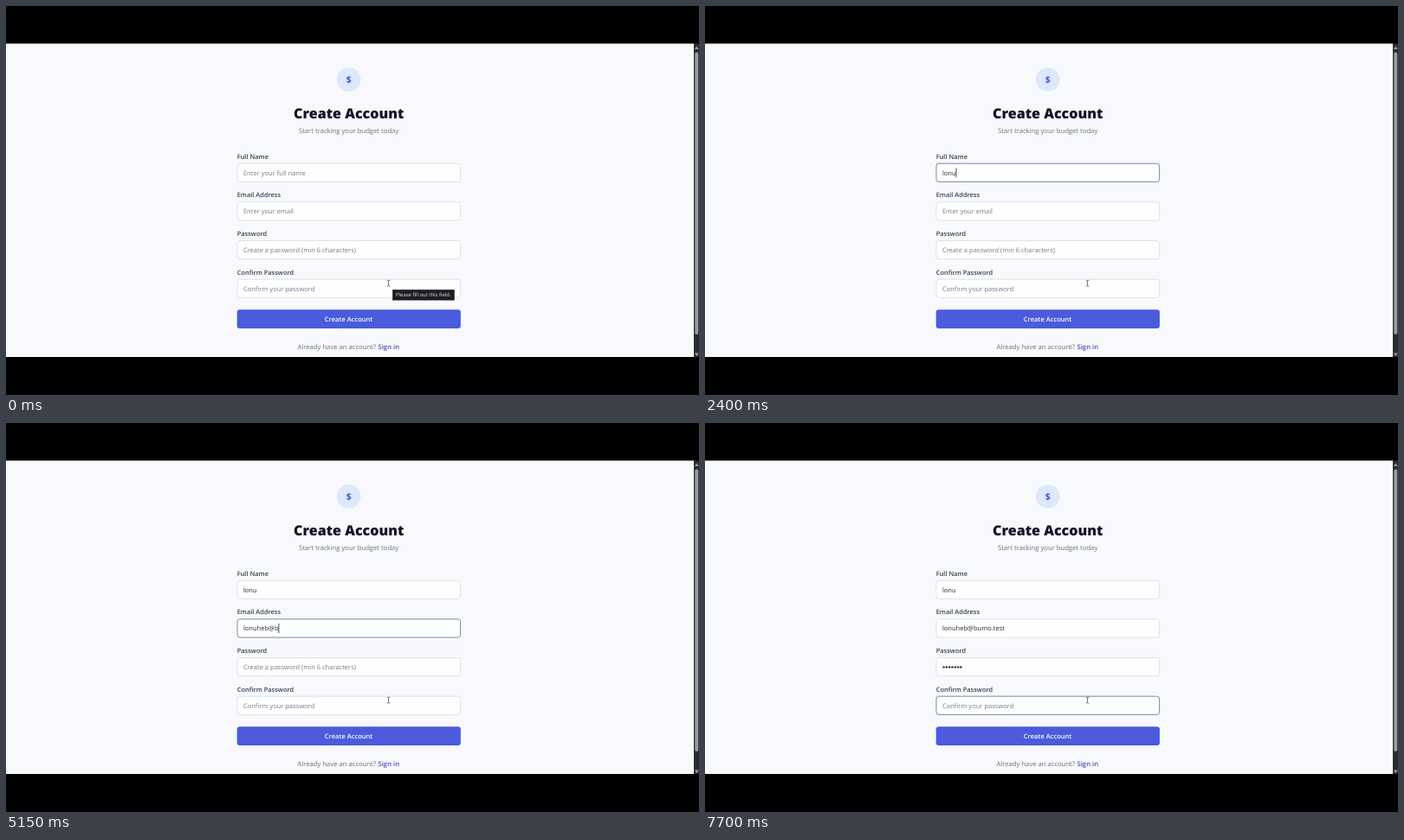
Animation of 800 by 450 pixels, one loop 8000 ms. Source, as an HTML page:

```html
<!DOCTYPE html>
<html lang="en">
<head>
<meta charset="utf-8">
<title>Create Account</title>
<style>
  html, body { margin: 0; width: 100%; height: 100%; overflow: hidden; background: #000; }
  svg { display: block; width: 100%; height: 100%; }
  text { font-family: "Open Sans", "Noto Sans", sans-serif; font-size: 7.55px; text-rendering: geometricPrecision; white-space: pre; }
  .mid { text-anchor: middle; }
  .label { font-size: 7.45px; font-weight: 600; fill: #3d414c; }
  .hint { fill: #7a7d85; }
  .value { fill: #2b2d35; }
  .muted { font-size: 7.68px; fill: #6d717a; }
</style>
</head>
<body>
<svg id="stage" viewBox="0 0 800 450">
  <rect width="800" height="450" fill="#000"/>
  <rect y="43.5" width="794" height="362.5" fill="#f8f9fc"/>

  <g id="scrollbar">
    <rect x="794" y="43.5" width="6" height="362.5" fill="#2c2c2e"/>
    <rect x="795.3" y="53.5" width="3.9" height="326.5" rx="1.9" fill="#9c9c9e"/>
    <path d="M795 50l2.3-3.6 2.3 3.6zM795 401.6l2.3 3.6 2.3-3.6z" fill="#9c9c9e"/>
  </g>

  <circle cx="395.7" cy="85" r="13.8" fill="#dce8fb"/>
  <text class="mid" x="395.8" y="88.8" style="font-size:10.6px;font-weight:700" fill="#4654cf">$</text>
  <text class="mid" x="395.8" y="130.2" style="font-size:16.1px;font-weight:800" fill="#15122a">Create Account</text>
  <text class="mid muted" x="395.6" y="147">Start tracking your budget today</text>

  <g id="form"></g>

  <rect x="266.7" y="351.2" width="258.2" height="21.8" rx="3.2" fill="#4a5bdb"/>
  <text class="mid" x="395.6" y="364.9" style="font-weight:600" fill="#fff">Create Account</text>
  <text class="muted" x="336.5" y="397.1">Already have an account?</text>
  <text x="429.5" y="397.1" style="font-size:7.7px;font-weight:600" fill="#4a50c4">Sign in</text>

  <path d="M439.8 317.4h1.2l.6.5.6-.5h1.2M441.6 317.9v5.6M439.8 324h1.2l.6-.5.6.5h1.2" fill="none" stroke="#4a4a4e" stroke-width=".8"/>

  <g id="tip">
    <rect x="446.3" y="328.2" width="71.4" height="12" fill="#1d1d20" stroke="#3a3a3e" stroke-width=".5"/>
    <text x="450" y="336.3" style="font-size:5.95px" fill="#e9e9ea">Please fill out this field.</text>
  </g>
  <rect id="caret" width=".9" height="11" fill="#33353d"/>
</svg>
<script>
const LOOP = 8000, BLINK = 500, LEFT = 273.9, DOT = 3.3;
const $ = id => document.getElementById(id);

// focus: when the field gains focus; keys: when each character lands
const fields = [
  { label: "Full Name", hint: "Enter your full name", value: "lonu",
    focus: 500, wake: 1400, keys: [1850, 2000, 2150, 2250] },
  { label: "Email Address", hint: "Enter your email", value: "lonuheb@bumo.test",
    focus: 3050, keys: [3350, 3450, 3550, 3650, 4000, 4100, 4500, 4650, 5000,
      5200, 5250, 5450, 5500, 5600, 5650, 5900, 5950] },
  { label: "Password", hint: "Create a password (min 6 characters)", secret: true,
    focus: 6050, keys: [6500, 6550, 6600, 6650, 6800, 6800, 6850] },
  { label: "Confirm Password", hint: "Confirm your password", focus: 7000, keys: [] }
];

function add(parent, tag, attrs, text = "") {
  const el = document.createElementNS("http://www.w3.org/2000/svg", tag);
  for (const k in attrs) el.setAttribute(k, attrs[k]);
  el.textContent = text;
  parent.appendChild(el);
  return el;
}

fields.forEach((f, i) => {
  const g = add($("form"), "g", {});
  f.top = 182.2 + i * 44.65;
  add(g, "text", { class: "label", x: 266.7, y: f.top - 5.4 }, f.label);
  f.box = add(g, "rect", { x: 267, y: f.top, width: 257.6, height: 21.2, rx: 3, fill: "#fdfefe" });
  f.text = add(g, "text", { x: LEFT, y: f.top + 13.4 });
  f.dots = f.secret ? f.keys.map((_, n) =>
    add(g, "circle", { cx: LEFT + 1.7 + n * DOT, cy: f.top + 10.9, r: 1.2, fill: "#25272e" })) : [];
});

function drawField(f, t, focused) {
  const count = f.keys.filter(k => k <= t).length;
  f.box.setAttribute("stroke", focused ? "#8285a4" : "#dcdfe3");
  f.box.setAttribute("stroke-width", focused ? 1 : 0.9);
  f.text.setAttribute("class", count ? "value" : "hint");
  f.text.textContent = !count ? f.hint : f.secret ? "" : f.value.slice(0, count);
  f.dots.forEach((d, n) => d.setAttribute("visibility", n < count ? "visible" : "hidden"));
  return !count ? 0 : f.secret ? count * DOT : f.text.getComputedTextLength();
}

function render(t) {
  const active = fields.filter(f => f.focus <= t).pop();
  let on = false;
  for (const f of fields) {
    const width = drawField(f, t, f === active);
    if (f !== active) continue;
    const last = Math.max(...[f.focus, f.wake || 0, ...f.keys].filter(k => k <= t));
    on = (t - last) % (2 * BLINK) < BLINK;
    $("caret").setAttribute("x", LEFT + width - 0.1);
    $("caret").setAttribute("y", f.top + 5.1);
  }
  $("caret").setAttribute("visibility", on ? "visible" : "hidden");
  $("tip").setAttribute("visibility", t < 50 ? "visible" : "hidden");
}

const start = performance.now();
function tick() {
  render((performance.now() - start) % LOOP);
  requestAnimationFrame(tick);
}
tick();
</script>
</body>
</html>
```
